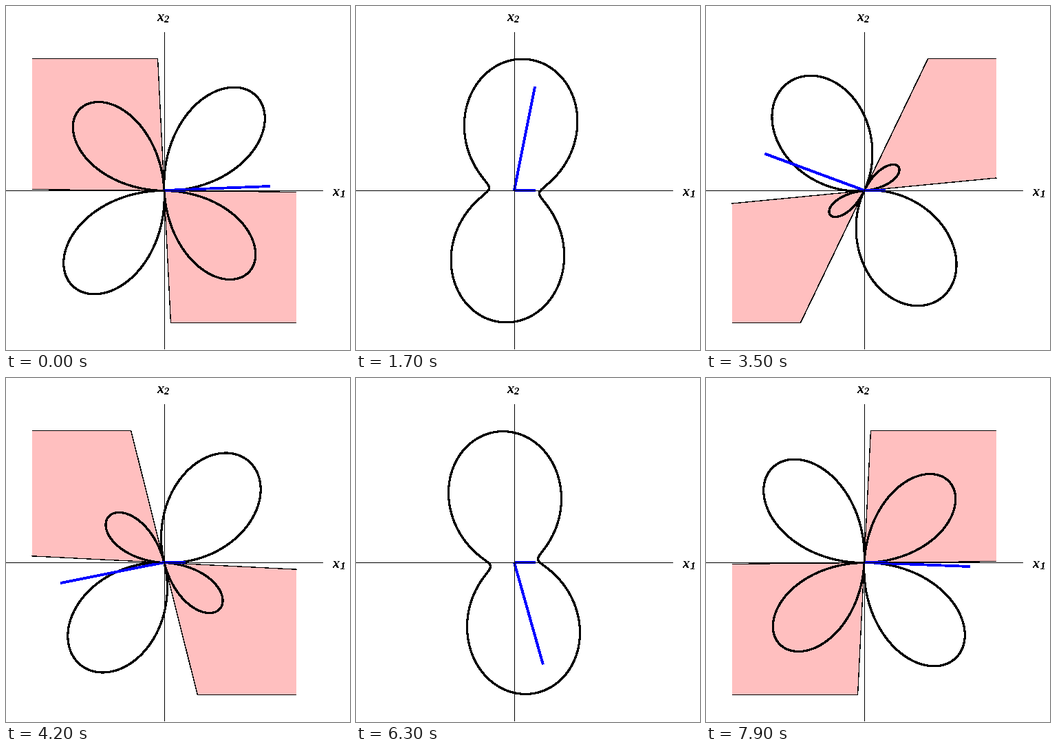
Recreate the animation shown at these times as a matplotlib script. Size 500 by 500 pixels, loop 8 s.

```python
import numpy as np
import matplotlib.pyplot as plt
from matplotlib.animation import FuncAnimation

SIZE, DPI = 500, 100
FRAMES, INTERVAL = 80, 100
CX, CY, UNIT = 229.5, 268, 192
AXIS_X, AXIS_Y = 230, 268
LAMBDA_1, LAMBDA_2 = 0.2, 1.0
VECTOR_SCALE = 0.8
HAIRLINE = 0.3


def px(width):
    return width * 72 / DPI


def to_stage(x, y):
    return CX + UNIT * np.asarray(x), CY - UNIT * np.asarray(y)


plt.rcParams["text.antialiased"] = False
fig = plt.figure(figsize=(SIZE / DPI, SIZE / DPI), dpi=DPI, facecolor="white")
ax = fig.add_axes([0, 0, 1, 1])
# Whole coordinates fall on pixel centres
ax.set_xlim(-0.5, SIZE - 0.5)
ax.set_ylim(SIZE - 0.5, -0.5)
ax.axis("off")


def line(width, color, z, xs=(), ys=()):
    # Without antialiasing every touched pixel is painted, so widths run thin
    return ax.plot(xs, ys, color=color, lw=px(width), zorder=z,
                   antialiased=False, snap=False, solid_capstyle="butt",
                   solid_joinstyle="round")[0]


def label(x, y, index):
    style = dict(family="Liberation Serif", weight="bold", style="italic",
                 ha="left", va="baseline")
    ax.text(x, y, "x", fontsize=px(20), **style)
    ax.text(x + 10, y + 3, index, fontsize=px(15), **style)


line(HAIRLINE, "black", 6, [0, 460], [AXIS_Y, AXIS_Y])
line(HAIRLINE, "black", 6, [AXIS_X, AXIS_X], [38, 498])
label(475, 275, "1")
label(220, 21, "2")

region, = ax.fill([CX] * 3, [CY] * 3, color="#ffbfbf", lw=0, zorder=1,
                  antialiased=False, snap=False)
edges = [line(HAIRLINE, "black", 2) for _ in range(2)]
curve = line(2.1, "black", 4)
vectors = [line(2.8, "blue", 5) for _ in range(2)]

phi = np.linspace(0, 2 * np.pi, 361)
COS, SIN = np.cos(phi), np.sin(phi)


def clipped_line(slope):
    """Points of y = slope * x, held inside the unit box."""
    bend = min(1, 1 / abs(slope))
    x = np.array([-1, -bend, 0, bend, 1])
    return x, np.clip(slope * x, -1, 1)


def draw_region(shear):
    # Slopes where the quadratic form vanishes
    disc = shear ** 2 - 4 * LAMBDA_1 * LAMBDA_2
    visible = disc > 0
    for artist in (region, *edges):
        artist.set_visible(visible)
    if not visible:
        return
    root = np.sqrt(disc)
    bounds = [clipped_line((-shear + s * root) / (2 * LAMBDA_2))
              for s in (-1, 1)]
    for edge, (x, y) in zip(edges, bounds):
        edge.set_data(*to_stage(x, y))
    (xa, ya), (xb, yb) = bounds
    outline = to_stage(np.r_[xa, xb[::-1]], np.r_[ya, yb[::-1]])
    region.set_xy(np.column_stack(outline))


def update(frame):
    theta = 2 * np.pi * (frame + 0.5) / FRAMES
    # Matrix with eigenvectors at angles 0 and theta
    shear = (LAMBDA_2 - LAMBDA_1) / np.tan(theta)
    form = LAMBDA_1 * COS ** 2 + shear * SIN * COS + LAMBDA_2 * SIN ** 2
    mean, diff = (LAMBDA_1 + LAMBDA_2) / 2, (LAMBDA_2 - LAMBDA_1) / 2
    r = np.abs(form) / (mean + np.hypot(diff, shear / 2))
    curve.set_data(*to_stage(r * COS, r * SIN))
    draw_region(shear)
    for vec, size, angle in zip(vectors, (LAMBDA_1, LAMBDA_2), (0, theta)):
        length = VECTOR_SCALE * size
        x, y = to_stage([0, length * np.cos(angle)],
                        [0, length * np.sin(angle)])
        vec.set_data(x, y - 0.5)
    return [region, *edges, curve, *vectors]


anim = FuncAnimation(fig, update, frames=FRAMES, interval=INTERVAL,
                     repeat=True, repeat_delay=0, blit=False)
plt.show()
```
